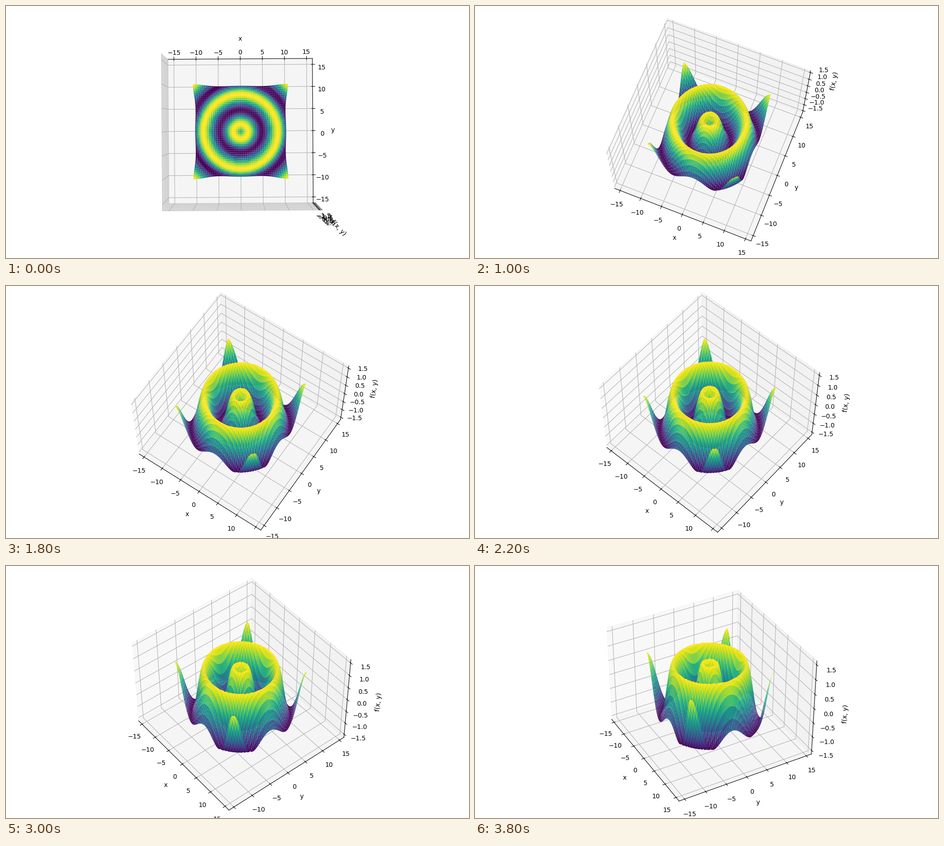
Animation of 1014 by 552 pixels, one loop 4000 ms. Source, as a matplotlib script:

```python
import numpy as np
import matplotlib.pyplot as plt
from matplotlib.animation import FuncAnimation

WIDTH, HEIGHT, DPI = 1014, 552, 100
SIDE, BOTTOM = 513, 14
STEPS, STEP_MS = 20, 200

# Hand-dragged camera path as (step, elevation, turn) in degrees
PATH = [(0, 90.35, -0.35), (2, 81.9, 9.4), (5, 70, 21.8), (9, 62.4, 34.1),
        (13, 51.6, 47.4), (17, 41.5, 54.9), (19, 35.3, 61)]


def ripple(x, y):
    return np.sin(np.hypot(x, y))


def camera(i):
    step, elev, turn = zip(*PATH)
    return np.interp(i, step, elev), np.interp(i, step, turn) - 90


fig = plt.figure(figsize=(WIDTH / DPI, HEIGHT / DPI), dpi=DPI)
ax = fig.add_axes(
    [(WIDTH - SIDE) / 2 / WIDTH, BOTTOM / HEIGHT, SIDE / WIDTH, SIDE / HEIGHT],
    projection="3d",
)

axis = np.linspace(-10, 10, 50)
x, y = np.meshgrid(axis, axis)
ax.plot_surface(x, y, ripple(x, y), cmap="viridis", edgecolor="none")

ax.set(xlim=(-16.32, 16.32), ylim=(-16.32, 16.32), zlim=(-1.632, 1.632))
ax.set_xlabel("x", labelpad=7)
ax.set_ylabel("y", labelpad=7)
ax.set_zlabel("f(x, y)", labelpad=7)
ax.tick_params(pad=5)


def show(i):
    elev, azim = camera(i)
    ax.view_init(elev=elev, azim=azim)
    return []


def reset():
    return show(0)


anim = FuncAnimation(fig, show, frames=STEPS, init_func=reset,
                     interval=STEP_MS, repeat=True, repeat_delay=0, blit=False)
plt.show()
```
